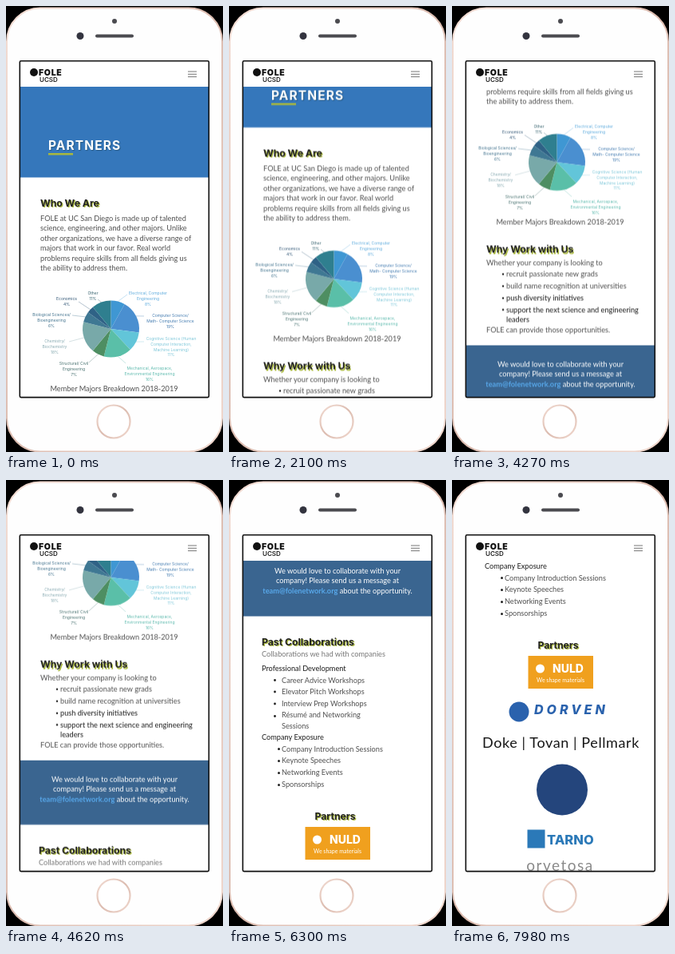
Recreate the animation shown at these times as an HTML page. Size 272 by 558 pixels, loop 8000 ms.

```html
<!DOCTYPE html>
<html lang="en">
<head>
<meta charset="utf-8">
<title>Partners page on a phone</title>
<style>
html, body { margin: 0; width: 100%; height: 100%; overflow: hidden; background: #000; }
svg { display: block; width: 272px; height: 558px; }
text { font: 9.2px Lato, "Open Sans", sans-serif; fill: #505050; }
.mid { text-anchor: middle; }
.head { font: 700 12.2px Inter, sans-serif; fill: #222; text-shadow: 1.2px 1.2px 0 #a9b83c; }
.dark { fill: #1c1c1c; }
.soft { fill: #777; }
.white { fill: #fff; }
.title { font: 700 15.5px Inter, sans-serif; letter-spacing: 1.1px; fill: #fff; text-shadow: 1px 1px 1px #2458; }
.label { font: 5px Inter, sans-serif; text-anchor: middle; }
.brand { font: 900 10.5px Inter, sans-serif; letter-spacing: .7px; fill: #111; }
.campus { font: 600 8px Inter, sans-serif; fill: #222; }
.page { animation: scroll 8s infinite; }
@keyframes scroll {
  0% { transform: translateY(0); animation-timing-function: ease-in; }
  26.25% { transform: translateY(-62.5px); animation-timing-function: ease-in-out; }
  40.25% { transform: translateY(-177px); animation-timing-function: ease-out; }
  53.375% { transform: translateY(-208.5px); animation-timing-function: ease-in-out; }
  63.875%, 65.625% { transform: translateY(-413px); animation-timing-function: linear; }
  67.375% { transform: translateY(-413.5px); animation-timing-function: ease-in-out; }
  78.75% { transform: translateY(-543px); animation-timing-function: ease-in-out; }
  99.75%, 100% { transform: translateY(-757px); }
}
</style>
</head>
<body>
<svg viewBox="0 0 272 558">
  <defs>
    <clipPath id="view"><rect x="18" y="69" width="236" height="420"/></clipPath>
    <linearGradient id="rim" x2="1" y2="1">
      <stop offset="0" stop-color="#f3ddd4"/>
      <stop offset=".5" stop-color="#dcbcb0"/>
      <stop offset="1" stop-color="#f0d8ce"/>
    </linearGradient>
  </defs>

  <rect x="1" y="2.5" width="270" height="555" rx="42" fill="#fefefe" stroke="url(#rim)" stroke-width="2"/>
  <circle cx="136" cy="19" r="3" fill="#4b4b50"/>
  <circle cx="93" cy="37.5" r="4.5" fill="#33343f"/>
  <rect x="112" y="35.5" width="48" height="4" rx="2" fill="#4b4b50"/>
  <circle cx="135" cy="520" r="20.5" fill="#fff" stroke="url(#rim)" stroke-width="2.2"/>

  <g clip-path="url(#view)">
    <rect x="18" y="69" width="236" height="420" fill="#fff"/>
    <g class="page">
      <rect x="18" y="69" width="236" height="145.5" fill="#3577bb"/>
      <text class="title" x="53" y="180">PARTNERS</text>
      <rect x="53" y="184" width="31" height="2.5" fill="#a9b83c"/>

      <text class="head" x="43" y="251">Who We Are</text>
      <text x="43" y="269">FOLE at UC San Diego is made up of talented</text>
      <text x="43" y="281.5">science, engineering, and other majors. Unlike</text>
      <text x="43" y="294">other organizations, we have a diverse range of</text>
      <text x="43" y="306.5">majors that work in our favor. Real world</text>
      <text x="43" y="319">problems require skills from all fields giving us</text>
      <text x="43" y="331.5">the ability to address them.</text>

      <g id="chart"></g>
      <text class="mid" x="135.5" y="482">Member Majors Breakdown 2018-2019</text>

      <text class="head" x="43" y="517.5">Why Work with Us</text>
      <text x="43" y="533">Whether your company is looking to</text>
      <text x="68" y="547">recruit passionate new grads</text>
      <text x="68" y="562">build name recognition at universities</text>
      <text class="dark" x="68" y="577">push diversity initiatives</text>
      <text class="dark" x="68" y="591.5">support the next science and engineering</text>
      <text class="dark" x="68" y="603.5">leaders</text>
      <text x="43" y="617">FOLE can provide those opportunities.</text>

      <rect x="18" y="633" width="236" height="80.5" fill="#3a6590"/>
      <text class="mid white" x="136" y="659.5">We would love to collaborate with your</text>
      <text class="mid white" x="136" y="672">company! Please send us a message at</text>
      <text class="mid white" x="136" y="684.5"><tspan fill="#58a8ea" font-weight="700">team@folenetwork.org</tspan> about the opportunity.</text>

      <text class="head" x="41" y="749.5">Past Collaborations</text>
      <text class="soft" x="41" y="763.5">Collaborations we had with companies</text>
      <text class="dark" x="41" y="782">Professional Development</text>
      <text x="66" y="796.5">Career Advice Workshops</text>
      <text x="66" y="811">Elevator Pitch Workshops</text>
      <text x="66" y="825.5">Interview Prep Workshops</text>
      <text x="66" y="840">Résumé and Networking</text>
      <text x="66" y="854">Sessions</text>
      <text class="dark" x="41" y="868">Company Exposure</text>
      <text x="66" y="882.5">Company Introduction Sessions</text>
      <text x="66" y="897">Keynote Speeches</text>
      <text x="66" y="912">Networking Events</text>
      <text x="66" y="926.5">Sponsorships</text>
      <g id="bullets" fill="#222"></g>

      <text class="head mid" x="133" y="967.5">Partners</text>

      <rect x="95.5" y="977" width="81.5" height="41" fill="#f0a01e"/>
      <circle cx="110.5" cy="993" r="5.5" fill="#fff"/>
      <text x="126" y="998" style="font: 800 14px Inter, sans-serif; fill: #fff">NULD</text>
      <text class="mid white" x="136" y="1009.5" style="font-size: 7px">We shape materials</text>

      <circle cx="84" cy="1047" r="12.5" fill="#2a62ad"/>
      <text x="103" y="1049.5" style="font: italic 800 16px Inter, sans-serif; letter-spacing: 4px; fill: #2a62ad">DORVEN</text>

      <text class="mid" x="136.5" y="1091.5" style="font-size: 18px; letter-spacing: .6px; fill: #161616">Doke | Tovan | Pellmark</text>

      <circle cx="138" cy="1144.5" r="32" fill="#24457c"/>

      <rect x="94.5" y="1194.5" width="22" height="23" fill="#2b79b8"/>
      <text x="119" y="1212.5" style="font: 800 16.5px Inter, sans-serif; fill: #2b79b8">TARNO</text>

      <text class="mid" x="135.5" y="1246" style="font-size: 19px; letter-spacing: 1.5px; fill: #8a8a8a">orvetosa</text>
    </g>

    <rect x="18" y="69" width="236" height="32" fill="#fff"/>
    <circle cx="35" cy="83" r="5" fill="#111"/>
    <text class="brand" x="41" y="87.3">FOLE</text>
    <text class="campus" x="42" y="95">UCSD</text>
    <path d="M228 82h11m-11 3.3h11m-11 3.3h11" stroke="#777"/>
  </g>
  <rect x="17.3" y="68.8" width="237" height="420.8" rx="1.5" fill="none" stroke="#111" stroke-width="1.6"/>
</svg>

<script>
const chart = document.getElementById('chart');
const bullets = document.getElementById('bullets');

function add(parent, tag, attrs, text) {
  const el = document.createElementNS('http://www.w3.org/2000/svg', tag);
  for (const key in attrs) el.setAttribute(key, attrs[key]);
  if (text) el.textContent = text;
  parent.append(el);
}

// percent, slice colour, label colour, label centre x, first label y, leader end, lines
const majors = [
  [8, '#3f97d3', '#5aa9dc', 178, 361, [152, 361], 'Electrical, Computer|Engineering'],
  [19, '#4a8fd0', '#3f78ae', 206, 389, [173, 388], 'Computer Science/|Math- Computer Science'],
  [11, '#62c5d9', '#7cc6d8', 207, 418, [173, 420], 'Cognitive Science (Human|Computer Interaction,|Machine Learning)'],
  [16, '#5abfa8', '#5cb9ad', 180, 455, [150, 447], 'Mechanical, Aerospace,|Environmental Engineering'],
  [7, '#4e8e62', '#47706f', 85, 449, [104, 446], 'Structural/ Civil|Engineering'],
  [18, '#78a9a9', '#86a9b0', 61, 421, [79, 420], 'Chemistry/|Biochemistry'],
  [6, '#3f7893', '#3f708c', 57, 388, [83, 387], 'Biological Sciences/|Bioengineering'],
  [4, '#2f6286', '#2c5272', 76, 368, [91, 370], 'Economics'],
  [11, '#2f7f8f', '#33606c', 109, 361, [115, 367], 'Other']
];
const cx = 131.5, cy = 404, radius = 35.5;
const rim = share => {
  const a = share / 50 * Math.PI;
  return [cx + radius * Math.sin(a), cy - radius * Math.cos(a)];
};

let sum = 0;
for (const [share, fill, ink, x, y, end, name] of majors) {
  add(chart, 'path', { d: `M${cx} ${cy}L${rim(sum)}A${radius} ${radius} 0 0 1 ${rim(sum + share)}Z`, fill });
  add(chart, 'path', { d: `M${rim(sum + share / 2)}L${end}`, stroke: ink, 'stroke-width': .5, opacity: .7 });
  [...name.split('|'), share + '%'].forEach((line, i) =>
    add(chart, 'text', { class: 'label', x, y: y + i * 6.8, style: `fill: ${ink}` }, line));
  sum += share;
}

const dots = (cx, r, rows) => rows.forEach(cy => add(bullets, 'circle', { cx, cy, r }));
dots(64, 1.2, [544, 559, 574, 588.5]);
dots(57.5, 1.4, [793.5, 808, 823, 838.5]);
dots(62.5, 1.5, [879.5, 894.5, 909.5, 924.5]);
</script>
</body>
</html>
```
